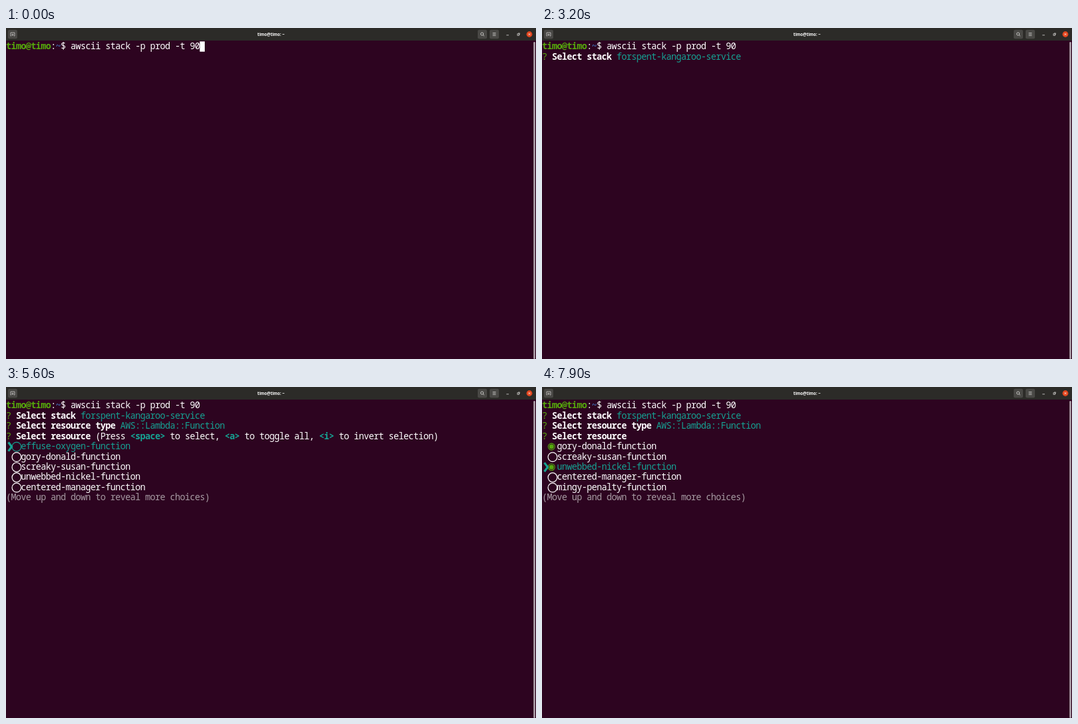
Animation of 800 by 500 pixels, one loop 8 s. Source, as an HTML page with a canvas:

```html
<!DOCTYPE html>
<html lang="en">
<head>
<meta charset="utf-8">
<title>Terminal</title>
<style>
html, body { margin: 0; width: 100%; height: 100%; overflow: hidden; background: #2d0420; }
#stage { position: absolute; left: 0; top: 0; width: 800px; height: 500px; overflow: hidden; }
canvas { position: absolute; left: 0; top: 0; }
#title {
  position: absolute; left: 0; top: 0; width: 800px; text-align: center;
  font: bold 6.1px/19px "Open Sans", "Noto Sans", sans-serif; color: #fff;
}
.row {
  position: absolute; left: 0; white-space: pre; color: #fff;
  font: 500 13.5px/15.44px "Noto Sans Mono", "DejaVu Sans Mono", monospace;
  letter-spacing: -0.6px;
}
.bold, .user, .path, .key { font-weight: bold; }
.user, .mark { color: #55a80c; }
.path { color: #3f68ac; }
.teal, .key { color: #16a293; }
.dim { color: #a79ba3; }
</style>
</head>
<body>
<div id="stage">
  <canvas id="view" width="800" height="500"></canvas>
  <div id="title">timo@timo: ~</div>
  <div id="screen"></div>
</div>
<script>
const LOOP = 8000, CELL = 7.5, LINE = 15.44, TOP = 20.3;
const TEAL = '#16a293', GREEN = '#55a80c';
const ctx = document.getElementById('view').getContext('2d');
const screenEl = document.getElementById('screen');

const PICK = 'forspent-kangaroo-service';
const KIND = 'AWS::Lambda::Function';
const MORE = '(Move up and down to reveal more choices)';
const stacks = ['abased-gear', 'able-father', 'acred-control', 'acred-song',
  'addorsed-peru', 'adunc-ceiling', 'afeard-mitten'].map(s => s + '-service');
const kinds = ['AWS::DynamoDB::Table', 'AWS::Events::Rule', KIND, 'AWS::SNS::Topic', 'AWS::SQS::Queue'];
const functions = ['effuse-oxygen', 'gory-donald', 'screaky-susan', 'unwebbed-nickel',
  'centered-manager', 'mingy-penalty'].map(s => s + '-function');

// Moments of user input and program output, in ms
const RUN = 300, STACKS = 900, TYPED = [2100, 2250, 2400, 2550], CHOSE = 3000;
const KINDS = 3700, KIND_DOWN = [4200, 4400], KIND_CHOSE = 5000;
const FUNCS = 5600, FUNC_DOWN = [6800, 7300, 7500], CHECKS = [[6600, 0], [7100, 1], [7700, 3]];

const passed = (times, t) => times.filter(x => t >= x).length;

function ask(label, ...rest) {
  return [['?', 'mark'], [' '], [label, 'bold'], [' '], ...rest];
}

function stateAt(t) {
  const rows = [[['timo@timo', 'user'], [':'], ['~', 'path'], ['$ awscii stack -p prod -t 90']]];
  const shapes = [];
  const item = (name, active, indent) => {
    if (active) shapes.push(['pointer', rows.length]);
    rows.push([[' '.repeat(indent)], [name, active ? 'teal' : '']]);
  };
  const cursor = (col, row) => shapes.push(['cursor', row, col]);

  if (t < RUN) cursor(39, 0);
  else if (t < STACKS) cursor(0, 1);
  else if (t < CHOSE) {
    const n = passed(TYPED, t), query = PICK.slice(0, n);
    if (!n) {
      rows.push(ask('Select stack', ['(Use arrow keys or type to search)', 'dim']));
      if (t < STACKS + 600) cursor(49, 1);
    } else {
      rows.push(ask('Select stack', [query]));
      cursor(15 + n, 1);
    }
    const found = n ? [...stacks, PICK].filter(s => s.includes(query)) : stacks;
    found.forEach((s, i) => item(s, i === 0, 2));
    if (!n) rows.push([[MORE, 'dim']]);
  } else {
    rows.push(ask('Select stack', [PICK, 'teal']));
  }

  if (t >= KINDS && t < KIND_CHOSE) {
    const at = passed(KIND_DOWN, t);
    rows.push(ask('Select resource type', [at ? '' : '(Use arrow keys)', 'dim']));
    kinds.forEach((s, i) => item(s, i === at, 2));
  } else if (t >= KIND_CHOSE) {
    rows.push(ask('Select resource type', [KIND, 'teal']));
  }

  if (t >= FUNCS) {
    const hint = t < CHECKS[0][0]
      ? [['(Press '], ['<space>', 'key'], [' to select, '], ['<a>', 'key'],
         [' to toggle all, '], ['<i>', 'key'], [' to invert selection)']]
      : [];
    rows.push(ask('Select resource', ...hint));
    const at = passed(FUNC_DOWN, t), first = Math.max(0, at - 2);
    const checked = CHECKS.filter(c => t >= c[0]).map(c => c[1]);
    functions.slice(first, first + 5).forEach((s, i) => {
      const id = first + i;
      shapes.push([checked.includes(id) ? 'on' : 'off', rows.length, id === at ? TEAL : '#fff']);
      item(s, id === at, 3);
    });
    rows.push([[MORE, 'dim']]);
  }
  return { rows, shapes };
}

function line(points, color, width) {
  ctx.strokeStyle = color;
  ctx.lineWidth = width;
  ctx.beginPath();
  points.forEach(([x, y]) => ctx.lineTo(x, y));
  ctx.stroke();
}

function circle(x, y, r, color, width) {
  ctx.beginPath();
  ctx.arc(x, y, r, 0, Math.PI * 2);
  if (width) {
    ctx.strokeStyle = color;
    ctx.lineWidth = width;
    ctx.stroke();
  } else {
    ctx.fillStyle = color;
    ctx.fill();
  }
}

function button(x) {
  ctx.fillStyle = '#494845';
  ctx.beginPath();
  ctx.roundRect(x, 2.8, 14, 13.4, 2);
  ctx.fill();
}

function drawWindow() {
  ctx.fillStyle = '#2d0420';
  ctx.fillRect(0, 0, 800, 500);
  ctx.fillStyle = '#2c2b28';
  ctx.fillRect(0, 0, 800, 19);
  [3, 712, 730].forEach(button);

  const ink = '#dedddb';
  line([[8, 12], [7, 12], [7, 7], [13, 7], [13, 12], [12, 12]], ink, 0.7);
  line([[10, 8.5], [10, 12]], ink, 0.7);
  line([[8.3, 10.2], [11.7, 10.2]], ink, 0.7);
  circle(718.6, 9, 2.1, ink, 0.8);
  line([[720.1, 10.5], [721.8, 12.2]], ink, 0.9);
  [7.5, 9.5, 11.5].forEach(y => line([[734.6, y], [739.4, y]], ink, 0.7));
  line([[755.3, 10.8], [758.9, 10.8]], ink, 0.8);
  ctx.strokeRect(772, 8.8, 2.4, 2.4);
  line([[773, 7.8], [775.4, 7.8], [775.4, 10.2]], ink, 0.6);
  circle(790, 9.5, 4.4, '#e2461f');
  line([[788.5, 8], [791.5, 11]], '#fff', 0.7);
  line([[791.5, 8], [788.5, 11]], '#fff', 0.7);

  ctx.fillStyle = '#b9aeb6';
  ctx.beginPath();
  ctx.roundRect(796.3, 21, 2.4, 479, 1.2);
  ctx.fill();
}

function drawShape([type, row, arg]) {
  const y = TOP + LINE * (row + 0.5);
  if (type === 'cursor') {
    ctx.fillStyle = '#fff';
    ctx.fillRect(arg * CELL, TOP + LINE * row, CELL, LINE);
  } else if (type === 'pointer') {
    line([[3.6, y - 6.3], [8.6, y + 0.4], [3.6, y + 7.1]], TEAL, 3.2);
  } else if (type === 'off') {
    circle(16, y + 0.5, 6.9, arg, 1.2);
  } else {
    circle(14.3, y + 0.3, 5, GREEN, 1.1);
    circle(14.3, y + 0.3, 3.5, GREEN);
  }
}

function showText(rows) {
  screenEl.replaceChildren(...rows.map((parts, i) => {
    const el = document.createElement('div');
    el.className = 'row';
    el.style.top = TOP + i * LINE + 'px';
    parts.forEach(([text, cls]) => {
      const span = document.createElement('span');
      span.textContent = text;
      if (cls) span.className = cls;
      el.append(span);
    });
    return el;
  }));
}

let last = '';
function frame(now) {
  const state = stateAt(now % LOOP);
  const key = JSON.stringify(state);
  if (key !== last) {
    last = key;
    drawWindow();
    state.shapes.forEach(drawShape);
    showText(state.rows);
  }
}

const start = performance.now();
function tick() {
  frame(performance.now() - start);
  requestAnimationFrame(tick);
}
tick();
</script>
</body>
</html>
```
